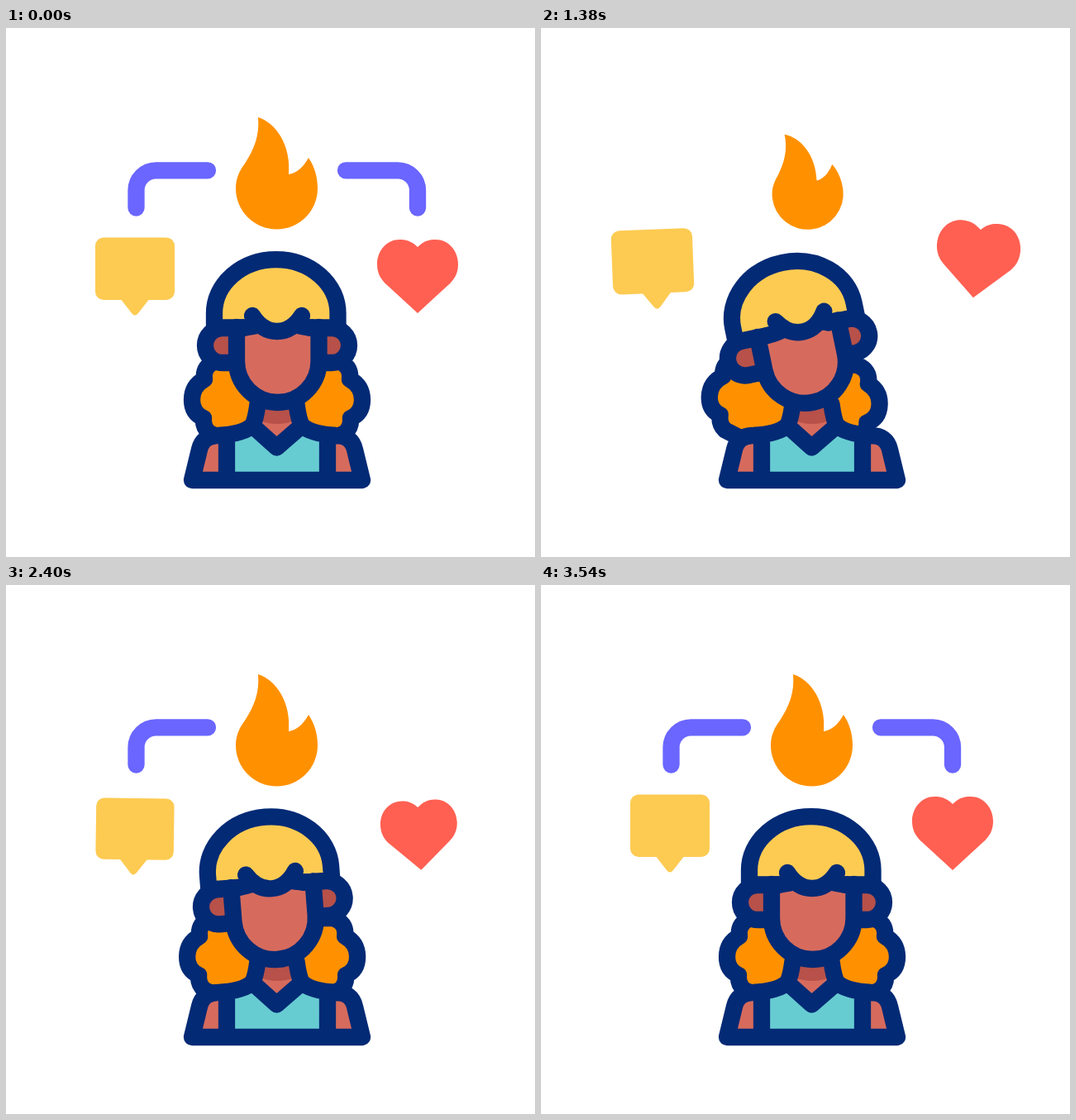
Animation, 640 px wide and 640 px high, one loop 3600 ms. Source, as an HTML page:

```html
<!DOCTYPE html>
<html lang="en">
<head>
<meta charset="utf-8">
<title>Reactions</title>
<style>
  html, body { margin: 0; width: 100%; height: 100%; overflow: hidden; background: #fff; }
  svg { display: block; width: 100vw; height: 100vh; }
  .ink { fill: none; stroke: #032a75; stroke-width: 20.3; stroke-linecap: round; stroke-linejoin: round; }
  .link { fill: none; stroke: #6a66ff; stroke-width: 20.3; stroke-linecap: round; }
  .orange { fill: #ff9100; }
  .yellow { fill: #fdcb52; }
  .red { fill: #ff6052; }
  .skin { fill: #d66b5d; }
  .shade { fill: #b75149; }
  .teal { fill: #67ccd1; }
</style>
</head>
<body>
<svg viewBox="0 0 640 640">
  <path id="linkL" class="link" pathLength="100" d="M157.500 217.500V196.300A24 24 0 0 1 181.500 172.300H244"/>
  <path id="linkR" class="link" pathLength="100" d="M411 172.300H474A24 24 0 0 1 498 196.300V217.500"/>

  <g id="hair">
    <path class="orange" d="M255 403Q238 408 240 425Q225 433 225 450Q225 466 239 472Q238 484 245 490L264 498H392L411 490Q418 484 417 472Q431 466 431 450Q431 433 416 425Q418 408 401 403Z"/>
    <path class="ink" d="M290 403H255Q238 408 240 425Q225 433 225 450Q225 466 239 472Q238 483 246 490L264 498"/>
    <path class="ink" d="M366 403H401Q418 408 416 425Q431 433 431 450Q431 466 417 472Q418 483 410 490L392 498"/>
  </g>

  <g id="body">
    <path class="skin" d="M225 547L234 510Q238 493 257 493H267V547ZM431 547L422 510Q418 493 399 493H389V547Z"/>
    <path class="teal" d="M267 547V492Q287 489 298 481L328 507L358 481Q369 489 389 492V547Z"/>
    <path class="skin" d="M305 450V485L328 507L351 485V450Z"/>
    <path class="shade" d="M304 450V474Q328 484 352 474V450Z"/>
    <path class="ink" d="M225 547L234 510Q238 493 257 493Q287 491 298 481L327.500 507.500L358 481Q369 491 399 493Q418 493 422 510L431 547ZM267 495V547M389 495V547M304.500 455Q302 474 298 481M351.500 455Q354 474 358 481"/>
  </g>

  <g id="head">
    <g id="ears">
      <path class="shade" d="M279 363H262A21 21 0 0 0 262 405H279ZM378 363H394A21 21 0 0 1 394 405H378Z"/>
      <path class="ink" d="M279 363H262A21 21 0 0 0 262 405H279M378 363H394A21 21 0 0 1 394 405H378"/>
    </g>
    <path class="skin" d="M279 360V403A49.750 50 0 0 0 378.500 403V360Z"/>
    <path class="yellow" d="M252 360V345A74.750 65 0 0 1 401.500 345V360Z"/>
    <path class="ink" d="M279 362V403A49.750 50 0 0 0 378.500 403V362"/>
    <path class="ink" d="M290 362.500H252V345A74.750 65 0 0 1 401.500 345V362.500H366"/>
    <path id="fringe" class="ink" d="M285 362.500Q298 362 304 359.500M371 362.500Q360 362 352 359.500M298 348Q310 367 328 367Q346 367 358 348"/>
  </g>

  <path id="flame" class="orange" d="M305 108C327 115 345 142 342 177Q356 175 366 157C373 167 377 180 377 194A49.500 49.500 0 0 1 278 194C278 181 283 172 289 164C300 147 307 130 305 108Z"/>

  <g id="bubble" class="yellow">
    <rect x="108" y="253.500" width="96" height="75.500" rx="10"/>
    <path id="tail" d="M138 327L152 345Q156 350 160 345L174 327Z"/>
  </g>

  <path id="heart" class="red" d="M498 265C490 257 483 256 476 256C461 256 449 269 449 286C449 297 454 305 461 311L498 345L535 311C542 305 547 297 547 286C547 269 535 256 520 256C513 256 506 257 498 265Z"/>
</svg>
<script>
const LOOP = 3600, START = 100, END = 3540;
const el = id => document.getElementById(id);

const span = (t, a, b) => Math.min(1, Math.max(0, (t - a) / (b - a)));
const easeOut = (t, a, b) => Math.sin(span(t, a, b) * Math.PI / 2);
const arc = (t, a, b) => Math.sin(span(t, a, b) * Math.PI);

function ease(t, a, b) {
  const u = span(t, a, b);
  return u * u * (3 - 2 * u);
}

// One swing until `mid`, then a weaker one the other way.
const swing = (t, mid, end, back) => arc(t, START, mid) - back * arc(t, mid, end);

// Moves a part by (dx, dy), turning and scaling it about (px, py).
function pose(id, px, py, dx, dy, angle = 0, scale = 1) {
  el(id).setAttribute('transform',
    `translate(${px + dx} ${py + dy}) rotate(${angle}) scale(${scale}) translate(${-px} ${-py})`);
}

// Wipes a line out from its beginning, then draws it again.
function trim(id, t, out, back) {
  const from = t < back ? 100 * ease(t, out, out + 480) : 0;
  const to = t < back ? 100 : 100 * ease(t, back, back + 480);
  const style = el(id).style;
  style.visibility = to - from > 0.3 ? 'visible' : 'hidden';
  style.strokeDasharray = `${to - from} 300`;
  style.strokeDashoffset = -from;
}

function moveBubble(t) {
  const x = -21.5 * (ease(t, 160, 1500) - ease(t, 1650, 2150));
  const y = -15 * swing(t, 1710, 2600, 0.4);
  const angle = -10 * swing(t, 1480, END, 0.08);
  pose('bubble', 156, 291, x, y, angle, 1 + 0.105 * swing(t, 1480, 2600, 0.3));
  pose('tail', 0, 0, -1.5 * angle, 0);
}

function moveHeart(t) {
  const x = 30 * (ease(t, 440, 1260) - ease(t, 1350, 2600));
  const y = -27 * swing(t, 1840, 2500, 0.18);
  const angle = 12 * swing(t, 1650, 2950, 0.26);
  pose('heart', 498, 300, x, y, angle, 1 + 0.168 * swing(t, 1470, 2600, 0.6));
}

function moveFlame(t) {
  const right = arc(t, START, 1040) ** 1.3, left = arc(t, 1040, 2050) ** 1.3;
  pose('flame', 328, 243.5, 0, 0, 7.8 * (right - left), 1 - 0.155 * (right + left));
}

function movePerson(t) {
  const lean = 12 * easeOut(t, START, 1200) - 7.5 * ease(t, 1300, 2100) - 4.5 * ease(t, 2500, END);
  const sway = 3 * (ease(t, START, 1000) - ease(t, 1380, 2000));
  const drop = 3.4 * arc(t, START, 950);
  pose('head', 328, 450, 0, drop, -lean);
  pose('ears', 0, 0, -sway, 0);
  pose('fringe', 0, 0, 2 * sway, 0);
  pose('hair', 328, 450, -1.3 * lean - 2 * sway, drop + 0.3 * sway, sway);
}

function draw(now) {
  const t = now % LOOP;
  trim('linkL', t, 118, 1640);
  trim('linkR', t, 775, 2410);
  moveBubble(t);
  moveHeart(t);
  moveFlame(t);
  movePerson(t);
  requestAnimationFrame(draw);
}
requestAnimationFrame(draw);
</script>
</body>
</html>
```
